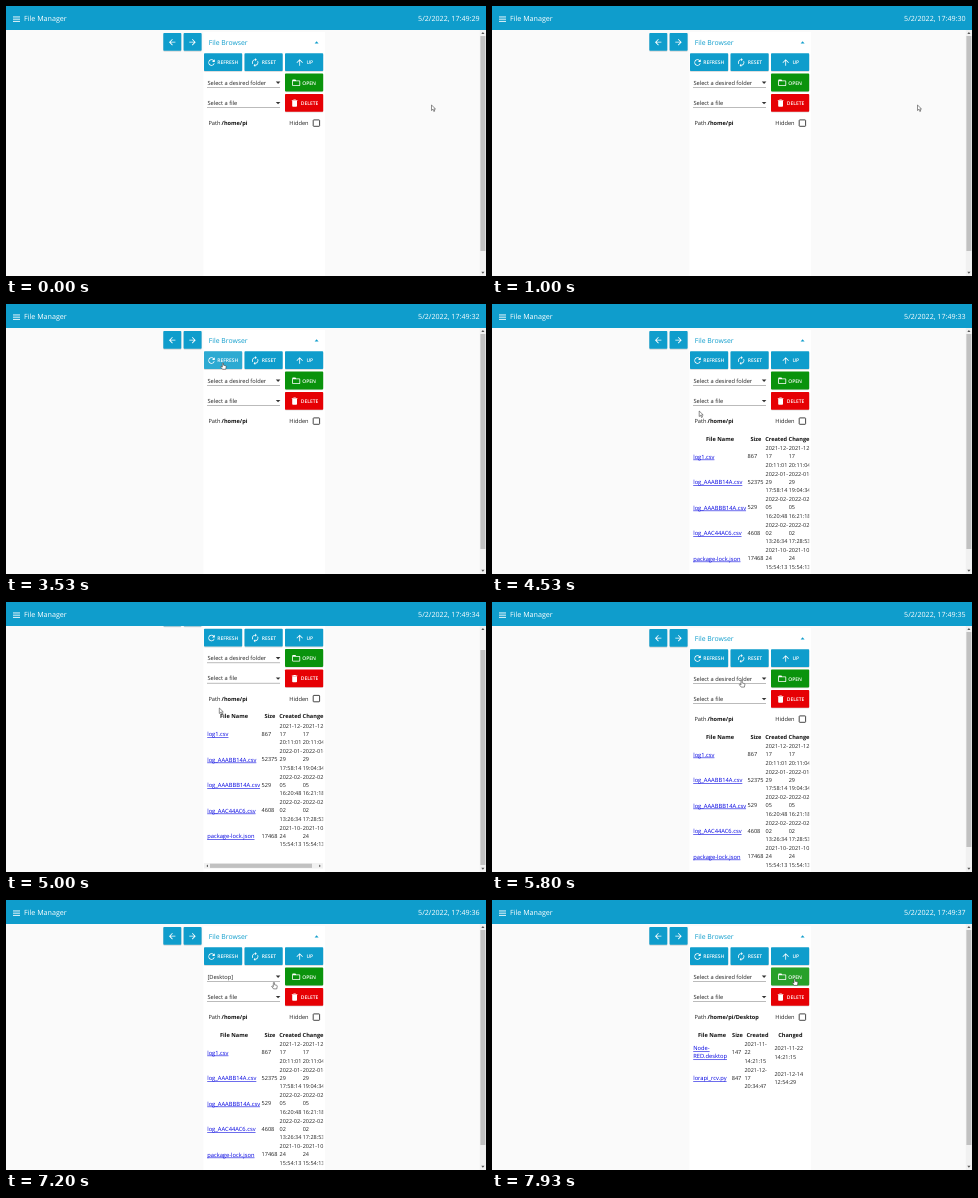
Write an HTML page that moves like this. It is 480 px wide and 270 px high and loops after 8000 ms.

```html
<!DOCTYPE html>
<html lang="en">
<head>
<meta charset="utf-8">
<title>File Manager</title>
<style>
html, body { margin: 0; width: 100%; height: 100%; overflow: hidden; background: #fafafa; }
svg { display: block; width: 100vw; height: 100vh; }
text { font-family: "Open Sans", "Noto Sans", sans-serif; text-rendering: geometricPrecision; white-space: pre; }
</style>
</head>
<body>
<svg id="stage" viewBox="0 0 480 270"></svg>
<script>
const LOOP = 8000;
const BLUE = '#0f9dcc', GREEN = '#0a930c', RED = '#e60004', INK = '#222', LINK = '#0000e0';
const ICONS = {
  refresh: 'M17.65 6.35C16.2 4.9 14.2 4 12 4a8 8 0 1 0 7.73 10h-2.08A6 6 0 1 1 16.22 7.78L13 11h7V4z',
  renew: 'M12 6v3l4-4-4-4v3a8 8 0 0 0-6.76 12.26L6.7 14.8A6 6 0 0 1 12 6zm6.76 1.74L17.3 9.2A6 6 0 0 1 12 18v-3l-4 4 4 4v-3a8 8 0 0 0 6.76-12.26z',
  arrow: 'M4 12l1.4 1.4L11 7.8V20h2V7.8l5.6 5.6L20 12l-8-8z',
  folder: 'M20 6h-8l-2-2H4a2 2 0 0 0-2 2v12a2 2 0 0 0 2 2h16a2 2 0 0 0 2-2V8a2 2 0 0 0-2-2zm0 12H4V8h16z',
  trash: 'M6 19a2 2 0 0 0 2 2h8a2 2 0 0 0 2-2V7H6zM19 4h-3.5l-1-1h-5l-1 1H5v2h14z'
};

const rect = (x, y, w, h, fill, more = '') =>
  `<rect x="${x}" y="${y}" width="${w}" height="${h}" fill="${fill}" ${more}/>`;
const path = (d, fill, more = '') => `<path d="${d}" fill="${fill}" ${more}/>`;
// y is the middle of the capitals
const text = (x, y, s, size = 5.7, fill = INK, more = '') =>
  `<text x="${x}" y="${y + size * .357}" font-size="${size}" fill="${fill}" ${more}>${s}</text>`;
const bold = (x, y, s, more = '') => text(x, y, s, 5.6, '#111', 'font-weight="700" ' + more);
const icon = (name, x, y, turn = 0) =>
  path(ICONS[name], '#fff', `transform="translate(${x} ${y}) rotate(${turn}) scale(.4) translate(-12 -12)"`);
const MID = 'text-anchor="middle"';

// Buttons: box, colour, icon, icon centre x, label, label x, icon turn
const buttons = [
  { x: 157.3, y: 27, w: 18, fill: BLUE, icon: 'arrow', ix: 166.2, turn: -90 },
  { x: 177.6, y: 27, w: 18, fill: BLUE, icon: 'arrow', ix: 186.5, turn: 90 },
  { x: 198, y: 47.3, w: 38.2, fill: BLUE, icon: 'refresh', ix: 205.6, label: 'REFRESH', lx: 211.2 },
  { x: 238.5, y: 47.3, w: 38.2, fill: BLUE, icon: 'renew', ix: 249.2, label: 'RESET', lx: 255.8 },
  { x: 279, y: 47.3, w: 38.2, fill: BLUE, icon: 'arrow', ix: 293.7, label: 'UP', lx: 300.4 },
  { x: 279, y: 67.6, w: 38.2, fill: GREEN, icon: 'folder', ix: 290.2, label: 'OPEN', lx: 296.3 },
  { x: 279, y: 87.9, w: 38.2, fill: RED, icon: 'trash', ix: 288.6, label: 'DELETE', lx: 294.8 }
].map(b => ({ h: 17.8, ...b }));
const REFRESH = buttons[2], OPEN = buttons[5];
const selects = [68, 88.3].map(y => ({ x: 199, y, w: 77, h: 16 }));
const menuBox = { x: 195, y: 37, w: 89.5, h: 229 };
const folders = ['Bookshelf', 'Desktop', 'Documents', 'Downloads', 'Music', 'Pictures', 'Public',
  'Templates', 'Videos', 'node_modules', 'progetto', 'single_chan_pkt_fwd'];

const button = b =>
  rect(b.x, b.y + .9, b.w, b.h, '#000', 'rx="1" opacity=".13"') +
  rect(b.x, b.y, b.w, b.h, b.fill, 'rx=".8"') +
  icon(b.icon, b.ix, b.y + 9.2, b.turn) +
  (b.label ? text(b.lx, b.y + 9.2, b.label, 5, '#fff', 'font-weight="600"') : '');

const caret = y => path(`M269.8 ${y - 1}h4.6l-2.3 2.4z`, '#333');
const selectBox = (y, id, s) =>
  text(201.4, y, s, 5.7, INK, `id="${id}"`) + caret(y) + rect(201, y + 4.5, 73, .5, '#777');

const link = (x, y, s) => text(x, y, s, 5.75, LINK, 'text-decoration="underline"');
const lines = (x, y, list) =>
  list.map((s, i) => text(x, y + (i - (list.length - 1) / 2) * 8.3, s, 5.5)).join('');
const stamp = s => [s.slice(0, 8), s.slice(8, 10), s.slice(11)];

function homeTable() {
  const rows = [
    ['log1.csv', 867, '2021-12-17 20:11:01', '2021-12-17 20:11:04'],
    ['log_AAABB14A.csv', 52375, '2022-01-29 17:58:14', '2022-01-29 19:04:34'],
    ['log_AAABBB14A.csv', 529, '2022-02-05 16:20:48', '2022-02-05 16:21:18'],
    ['log_AAC44AC6.csv', 4608, '2022-02-02 13:26:34', '2022-02-02 17:28:53'],
    ['package-lock.json', 17468, '2021-10-24 15:54:13', '2021-10-24 15:54:13']
  ];
  return bold(228, 134.6, 'File Name', MID) + bold(263.8, 134.6, 'Size', MID) +
    bold(273.2, 134.6, 'Created') + bold(296.6, 134.6, 'Changed') +
    rows.map(([name, size, made, changed], i) => {
      const y = 152.5 + i * 25.5;
      return link(201.2, y, name) + text(255.5, y, size, 5.6) +
        lines(273.5, y, stamp(made)) + lines(296.7, y, stamp(changed));
    }).join('') +
    rect(198, 281.6, 119, 5.4, '#f1f1f1') + rect(204, 282.2, 102, 4.2, '#c1c1c1') +
    path('M202 283v2.8l-1.6-1.4zM313.2 283v2.8l1.6-1.4z', '#555');
}

function desktopTable() {
  const heads = [[220, 'File Name'], [245.5, 'Size'], [265.5, 'Created'], [298.3, 'Changed']];
  return heads.map(([x, s]) => bold(x, 134.6, s, MID)).join('') +
    link(201.2, 148.4, 'Node-') + link(201.2, 156.4, 'RED.desktop') + text(239.7, 152.5, '147', 5.6) +
    lines(252.4, 152.5, stamp('2021-11-22 14:21:15')) + lines(282.4, 152.5, ['2021-11-22', '14:21:15']) +
    link(201.2, 178, 'lorapi_rcv.py') + text(239.7, 178, '847', 5.6) +
    lines(252.4, 178, stamp('2021-12-17 20:34:47')) + lines(282.4, 178, ['2021-12-14', '12:54:29']);
}

function menu() {
  const { x, y, w, h } = menuBox;
  return rect(x - .6, y, w + 1.2, h + 1.2, '#000', 'rx="1" opacity=".1"') +
    rect(x, y, w, h, '#fff', 'stroke="#9db9c6" stroke-width=".6"') +
    `<circle cx="269.9" cy="45.2" r="2.2" fill="none" stroke="${BLUE}" stroke-width=".9"/>` +
    path('M271.5 46.8l2.4 2.4', 'none', `stroke="${BLUE}" stroke-width="1.1"`) +
    rect(x + .3, 51.8, 83, .5, '#ccc') +
    rect(x + .3, 52.3, 83.3, 17.9, '#eee') + rect(x + .3, 70.2, 83.3, 18, BLUE) +
    folders.map((s, i) => text(200.4, 61.5 + 18 * i, `[${s}]`, 5.65)).join('') +
    rect(278.8, y + .3, 5.4, h - .6, '#f1f1f1') + rect(279.3, 42.5, 4.4, 200.5, '#c1c1c1') +
    path('M280 41h3l-1.5-1.8zM280 262h3l-1.5 1.8z', '#555');
}

document.getElementById('stage').innerHTML = `
<defs>
  <clipPath id="tableClip">${rect(198, 125, 119.2, 165, '#000')}</clipPath>
  <clipPath id="buttonClip"><rect id="clipBox"/></clipPath>
</defs>
${rect(0, 0, 480, 270, '#fafafa')}
<g id="page">
  ${rect(197.5, 26, 121.5, 270, '#fff')}
  ${text(202.7, 36.2, 'File Browser', 6.85, BLUE)}
  ${path('M308.6 37.6h4l-2-2.4z', BLUE)}
  ${buttons.map(button).join('')}
  <rect id="hover" fill="#fff" opacity=".08"/>
  <g clip-path="url(#buttonClip)"><circle id="ripple" fill="#fff"/></g>
  ${selectBox(76.6, 'folder', 'Select a desired folder')}
  ${selectBox(96.9, 'file', 'Select a file')}
  ${text(202.4, 117.2, 'Path')}
  ${bold(215.6, 117.2, '/home/pi', 'id="path"')}
  ${text(283.3, 117.2, 'Hidden')}
  ${rect(307.2, 113.9, 6.4, 6.4, '#fff', 'rx=".6" stroke="#333" stroke-width=".9"')}
  <g clip-path="url(#tableClip)"><g id="home">${homeTable()}</g><g id="desktop">${desktopTable()}</g></g>
</g>
${rect(473.8, 24, 6.2, 246, '#f1f1f1')}
${rect(474.4, 30, 5, 215, '#c1c1c1', 'id="thumb"')}
${path('M475.3 28h3.2l-1.6-1.9zM475.3 265.8h3.2l-1.6 1.9z', '#555')}
${rect(0, 0, 480, 24, BLUE)}
${[10.5, 12.7, 14.9].map(y => rect(7, y, 7, .9, '#fff')).join('')}
${text(18, 12.7, 'File Manager', 7.15, '#fff')}
${text(473.6, 12.7, '', 7.13, '#fff', 'id="clock" text-anchor="end"')}
<g id="menu">${menu()}</g>
<g id="cursor" stroke="#333" stroke-width=".55" stroke-linejoin="round">
  ${path('M0 0v5.5l1.3-1.2 1 2.2 1-.45-1-2.1h1.7z', '#fff', 'id="arrow"')}
  ${path('M-.6.6Q0-.4.6.6V2.7l2 .5q.8.2.7 1l-.5 2.6h-3.2L-2.3 4.4q.2-.9 1.1-.3l.6.5z', '#fff', 'id="hand"')}
</g>`;

const el = {};
document.querySelectorAll('[id]').forEach(n => el[n.id] = n);

const set = (node, values) => { for (const k in values) node.setAttribute(k, values[k]); };
const show = (node, on) => node.setAttribute('display', on ? 'inline' : 'none');
const ramp = (t, a, b) => Math.min(1, Math.max(0, (t - a) / (b - a)));
const ease = p => p * p * (3 - 2 * p);
const inside = (b, x, y) => x >= b.x && x <= b.x + b.w && y >= b.y && y <= b.y + b.h;

// Pointer stops: time, x, y
const stops = [
  [0, 425.5, 99], [1500, 425.5, 99], [2130, 400.5, 97], [2330, 342, 125], [2600, 272, 161],
  [2900, 228, 110], [3150, 217, 58], [3500, 217, 58], [4000, 209, 101], [4400, 207.2, 107],
  [4600, 207.2, 107], [5000, 213.3, 106], [5250, 216, 104], [5700, 249.6, 78.3], [6350, 249.6, 78.3],
  [6750, 246.8, 84.2], [7000, 246.8, 84.2], [7480, 302.6, 78.6], [LOOP, 302.6, 78.6]
];

function pointer(t) {
  const i = stops.findIndex(s => s[0] > t);
  const [t0, x0, y0] = stops[i - 1], [t1, x1, y1] = stops[i];
  const p = ease(ramp(t, t0, t1));
  return [x0 + (x1 - x0) * p, y0 + (y1 - y0) * p];
}

function ripple(t) {
  const [b, start] = t < 5000 ? [REFRESH, 3230] : [OPEN, 7620];
  const p = ramp(t, start, start + 400);
  set(el.clipBox, { x: b.x, y: b.y, width: b.w, height: b.h });
  set(el.ripple, {
    cx: b === OPEN ? 302.6 : 217, cy: b.y + 10.5, r: 32 * Math.sqrt(p),
    opacity: p > 0 && p < 1 ? .2 * (1 - p) : 0
  });
}

function draw(t) {
  const scroll = ease(ramp(t, 4600, 4780)) - ease(ramp(t, 5250, 5420));
  const shift = 20.5 * scroll;
  set(el.page, { transform: `translate(0 ${-shift})` });
  set(el.thumb, { y: 30 + 18 * scroll });

  el.clock.textContent = `5/2/2022, 17:49:${29 + Math.floor((t + 294) / 994)}`;
  const opened = t >= 7730;
  el.folder.textContent = t >= 6930 && !opened ? '[Desktop]' : 'Select a desired folder';
  el.path.textContent = opened ? '/home/pi/Desktop' : '/home/pi';
  show(el.home, t >= 3730 && !opened);
  show(el.desktop, opened);

  const open = ease(ramp(t, 6130, 6330)), gone = ramp(t, 6930, 7080);
  const menuOn = open > 0 && gone < 1;
  const grow = .7 + .3 * open;
  show(el.menu, menuOn);
  set(el.menu, {
    opacity: open * (1 - gone),
    transform: `translate(240 79) scale(${grow}) translate(-240 -79)`
  });

  const [x, y] = pointer(t);
  const over = !menuOn && buttons.find(b => inside(b, x, y + shift));
  show(el.hover, over);
  if (over) set(el.hover, { x: over.x, y: over.y, width: over.w, height: over.h });
  ripple(t);

  const hand = over || (menuOn ? inside(menuBox, x, y) : selects.some(s => inside(s, x, y + shift)));
  show(el.hand, hand);
  show(el.arrow, !hand);
  set(el.cursor, { transform: `translate(${x} ${y})` });
}

const begin = performance.now();
function tick() {
  draw((performance.now() - begin) % LOOP);
  requestAnimationFrame(tick);
}
tick();
</script>
</body>
</html>
```
